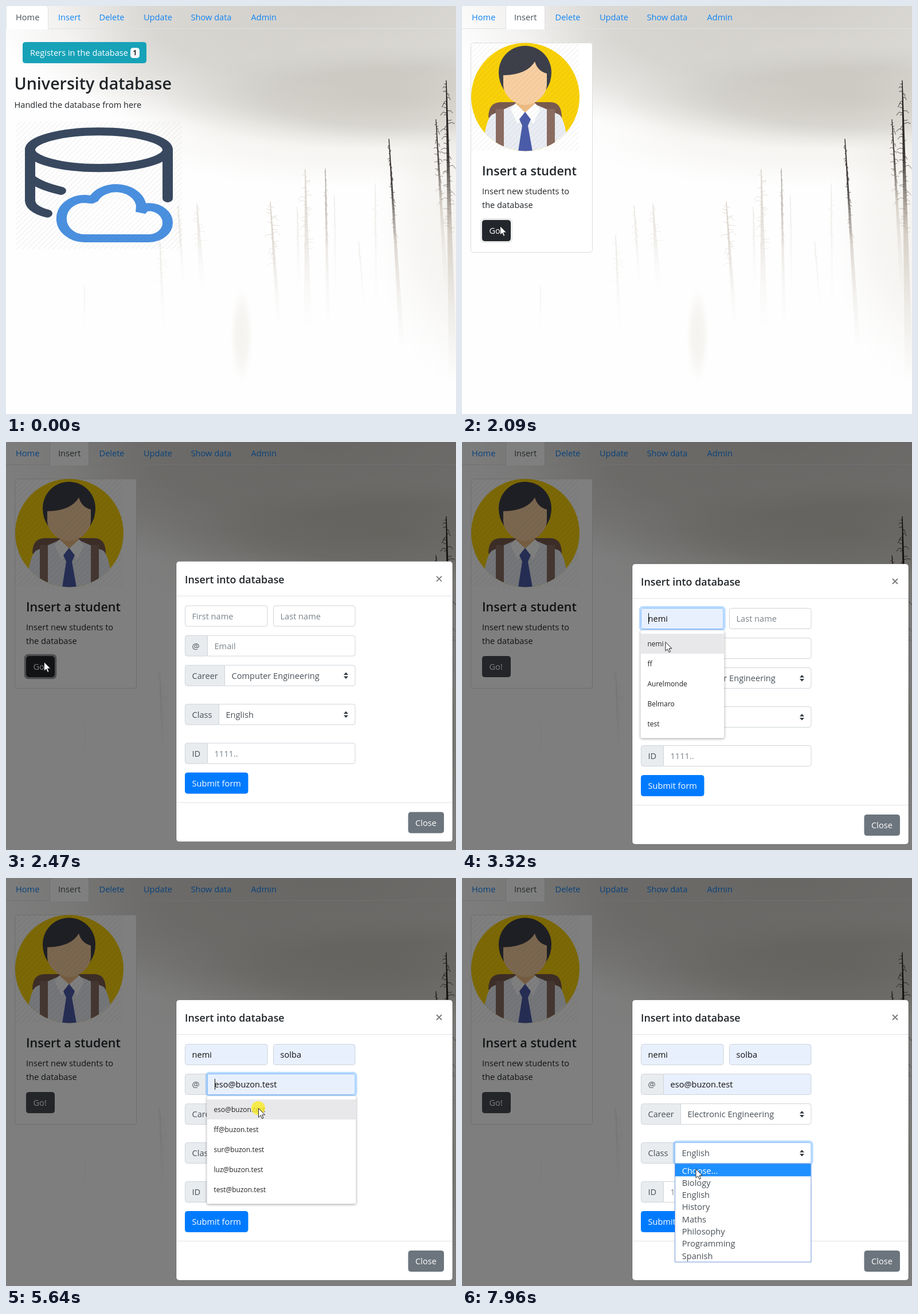
Recreate the animation shown at these times as an HTML page with a canvas. Size 785 by 713 pixels, loop 8000 ms.

```html
<!DOCTYPE html>
<html lang="en">
<head>
<meta charset="utf-8">
<title>University database</title>
<style>
html, body { margin: 0; width: 100%; height: 100%; overflow: hidden; background: #fff; }
canvas { display: block; width: 100vw; height: 100vh; }
</style>
</head>
<body>
<canvas id="stage" width="785" height="713"></canvas>
<script>
const W = 785, H = 713, LOOP = 8000;
const stage = document.getElementById('stage');
let g = stage.getContext('2d');

const clamp = v => Math.max(0, Math.min(1, v));
const ramp = (t, start, len) => clamp((t - start) / len);
const within = (t, a, b) => t >= a && t < b;

function text(s, x, y, color, size = 14.6, weight = 400) {
  g.font = `${weight} ${size}px "Open Sans", "Noto Sans", sans-serif`;
  g.fillStyle = color;
  g.fillText(s, x, y);
}

function box(x, y, w, h, fill, line, r = 4) {
  g.beginPath();
  g.roundRect(x + .5, y + .5, w - 1, h - 1, r);
  if (fill) { g.fillStyle = fill; g.fill(); }
  g.strokeStyle = line || fill;
  g.lineWidth = 1;
  g.stroke();
}

function ring(x, y, w, h, color, alpha) {
  if (alpha <= 0) return;
  g.save();
  g.globalAlpha *= alpha;
  g.strokeStyle = color;
  g.lineWidth = 3.2;
  g.beginPath();
  g.roundRect(x - 1.6, y - 1.6, w + 3.2, h + 3.2, 5);
  g.stroke();
  g.restore();
}

function shape(d, fill, line, width) {
  const p = new Path2D(d);
  if (fill) { g.fillStyle = fill; g.fill(p); }
  if (line) { g.strokeStyle = line; g.lineWidth = width; g.stroke(p); }
}

function hatch(x, y, w, h) {
  g.save();
  g.beginPath();
  g.rect(x, y, w, h);
  g.clip();
  g.strokeStyle = 'rgba(90,90,90,.07)';
  g.lineWidth = 1.5;
  g.beginPath();
  for (let i = 0; i < w + h; i += 9) {
    g.moveTo(x + i, y);
    g.lineTo(x + i - h, y + h);
  }
  g.stroke();
  g.restore();
}

// Foggy backdrop, painted once.
function cloud(x, y, rx, ry, rgb, alpha) {
  g.save();
  g.translate(x, y);
  g.scale(rx, ry);
  const grad = g.createRadialGradient(0, 0, 0, 0, 0, 1);
  grad.addColorStop(0, `rgba(${rgb},${alpha})`);
  grad.addColorStop(.55, `rgba(${rgb},${alpha * .75})`);
  grad.addColorStop(.8, `rgba(${rgb},${alpha * .25})`);
  grad.addColorStop(1, `rgba(${rgb},0)`);
  g.fillStyle = grad;
  g.fillRect(-1, -1, 2, 2);
  g.restore();
}

let seed = 11;
const rnd = () => (seed = seed * 16807 % 2147483647) / 2147483647;

function tree(x0, y0, x1, y1, width, alpha, rgb, reach) {
  const grad = g.createLinearGradient(0, y0, 0, y1);
  grad.addColorStop(0, `rgba(${rgb},${alpha})`);
  grad.addColorStop(.25, `rgba(${rgb},${alpha * .8})`);
  grad.addColorStop(.5, `rgba(165,150,130,${alpha * .4})`);
  grad.addColorStop(.75, `rgba(185,175,160,${alpha * .15})`);
  grad.addColorStop(1, 'rgba(190,180,165,0)');
  g.fillStyle = g.strokeStyle = grad;
  const h = y1 - y0;
  g.beginPath();
  g.moveTo(x0 - .6, y0);
  g.lineTo(x0 + .6, y0);
  g.lineTo(x1 + width / 2, y1);
  g.lineTo(x1 - width / 2, y1);
  g.fill();
  g.lineWidth = .8;
  g.beginPath();
  for (let y = 6; y < h * .5; y += 3 + rnd() * 5) {
    const x = x0 + (x1 - x0) * y / h;
    const side = rnd() < .5 ? -1 : 1;
    const len = reach * (.3 + rnd() * .7) * Math.min(1, .3 + y / 50);
    g.moveTo(x, y0 + y);
    g.lineTo(x + side * len * .6, y0 + y + rnd() * 4 - 3);
    g.lineTo(x + side * len, y0 + y + rnd() * 8 - 3);
  }
  g.stroke();
}

function paintFog() {
  g.fillStyle = '#fefefe';
  g.fillRect(0, 0, W, H);
  cloud(610, 220, 430, 100, '232,229,222', .4);
  cloud(560, -20, 600, 270, '203,200,194', .9);
  cloud(690, 160, 420, 92, '188,186,175', .62);
  cloud(350, 100, 250, 110, '208,206,201', .4);
  cloud(810, 370, 170, 300, '226,222,214', .35);
  const pale = '172,158,136', dark = '22,16,14';
  [
    [268, 400, 275, 570, 7, .2, 12], [300, 348, 310, 490, 7, .24, 9],
    [333, 345, 343, 500, 12, .28, 14], [461, 342, 476, 560, 9, .46, 15],
    [508, 350, 511, 510, 7, .16, 6], [522, 285, 527, 570, 14, .4, 14],
    [573, 330, 575, 520, 5, .15, 4], [615, 410, 626, 540, 3, .18, 3],
    [644, 310, 646, 540, 5, .18, 6], [137, 490, 137, 575, 3, .12, 2]
  ].forEach(([a, b, c, d, w, o, r]) => tree(a, b, c, d, w, o, pale, r));
  tree(557, 284, 562, 560, 7, .5, '115,106,94', 4);
  tree(668, 232, 691, 600, 9, .9, dark, 5);
  tree(750, 198, 768, 500, 8, .85, dark, 8);
  tree(768, 130, 780, 660, 15, 1, dark, 13);
  cloud(411, 575, 20, 85, '200,190,170', .17);
}

const fog = document.createElement('canvas');
fog.width = W;
fog.height = H;
{
  const main = g;
  g = fog.getContext('2d');
  paintFog();
  g = main;
}

// Pointer route: time, x, y of the tip.
const route = [
  [300, 688, 712], [780, 106, 14], [1180, 106, 14], [1780, 66, 384],
  [2670, 66, 384], [3040, 338, 307], [3150, 338, 307], [3310, 354.5, 349],
  [3640, 354.5, 349], [3990, 498, 307], [4130, 498, 307], [4340, 505, 351],
  [4480, 505, 351], [4740, 432, 359], [5010, 432, 359], [5410, 440, 402],
  [5740, 440, 402], [5880, 446, 408], [6020, 446, 408], [6220, 450, 412],
  [6340, 450, 412], [6560, 419, 465], [6620, 419, 465], [6800, 430, 493],
  [7400, 430, 493], [7680, 432, 478], [7790, 432, 478], [7950, 407.5, 508]
];
// Time of each press and how long its marker stays.
const presses = [[1000, 150], [1880, 150], [3050, 120], [3550, 130], [4040, 120], [4400, 130],
  [4750, 120], [5640, 130], [6240, 120], [6950, 230], [7690, 120]];

function pointer(t) {
  if (t < route[0][0]) return { x: -99, y: -99 };
  const i = route.findIndex(k => k[0] > t);
  if (i < 0) return { x: route.at(-1)[1], y: route.at(-1)[2] };
  const [ta, xa, ya] = route[i - 1], [tb, xb, yb] = route[i];
  const u = (t - ta) / (tb - ta), e = u * u * (3 - 2 * u);
  return { x: xa + (xb - xa) * e, y: ya + (yb - ya) * e };
}
const over = (p, x, y, w, h) => p.x >= x && p.x < x + w && p.y >= y && p.y < y + h;

function drawPointer(t, p) {
  if (presses.some(([a, len]) => within(t, a, a + len))) {
    g.fillStyle = 'rgba(250,236,40,.82)';
    g.beginPath();
    g.arc(p.x, p.y, 12, 0, 7);
    g.fill();
  }
  g.save();
  g.translate(p.x, p.y);
  g.lineJoin = 'miter';
  shape('M.5 .5V16.2L4.1 12.8 6.6 18.4 9 17.3 6.6 11.9H11.6Z', '#fff', '#222', 1);
  g.restore();
}

const tabs = [['Home', 17], ['Insert', 91], ['Delete', 162.5], ['Update', 240],
  ['Show data', 322.5], ['Admin', 427.5]];

function drawTabs(t) {
  const active = t < 1070 ? 0 : 1;
  g.fillStyle = '#dee2e6';
  g.fillRect(0, 39, W, 1);
  const [x, w] = active ? [76, 69] : [0, 74];
  g.beginPath();
  g.roundRect(x + .5, -.5, w - 1, 41, [4, 4, 0, 0]);
  g.fillStyle = '#fff';
  g.fill();
  g.strokeStyle = '#dee2e6';
  g.lineWidth = 1;
  g.stroke();
  g.fillStyle = '#fff';
  g.fillRect(x + 1, 39, w - 2, 2);
  tabs.forEach(([name, tx], i) => text(name, tx, 25, i === active ? '#495057' : '#0f84f5'));
}

// The icon is squashed vertically, so its strokes are thinner across the top.
function drawDisk() {
  const ink = '#38485f';
  g.save();
  g.translate(0, 202);
  g.scale(1, .78);
  g.lineCap = g.lineJoin = 'round';
  shape('M42 63V177Q43 196 72 206M42 126Q58 144 96 155M282 63V172', null, ink, 18);
  shape('M42 63A120 41 0 0 1 282 63A120 41 0 0 1 42 63Z', 'rgba(255,255,255,.85)', ink, 18);
  g.lineCap = 'butt';
  g.lineJoin = 'bevel';
  shape('M137 261.5A40 44 0 0 1 137 173L152 175A44 44 0 0 1 236 190L235 203Q240 191.5 249 191.5A33 35 0 0 1 249 261.5Z',
    '#fff', '#4a90e0', 18);
  g.restore();
  hatch(17, 202, 290, 223);
}

function drawHome(p) {
  box(29, 63, 216, 37, over(p, 29, 63, 216, 37) ? '#138496' : '#17a2b8');
  text('Registers in the database', 42, 87, '#fff');
  box(217, 73, 16, 18, '#f8f9fa');
  text('1', 221.5, 86, '#212529', 11.5, 700);
  text('University database', 14.5, 146, '#212529', 28.6, 600);
  text('Handled the database from here', 14.5, 177.5, '#212529');
  drawDisk();
}

function drawStudent() {
  g.save();
  g.beginPath();
  g.arc(110.5, 159, 94.5, 0, 7);
  g.clip();
  g.fillStyle = '#f9d108';
  g.fillRect(15, 64, 192, 190);
  shape('M46 195Q46 168 68 168H154Q174 168 174 195Z', '#795a4e');
  shape('M36 254Q40 200 52 190L92 172H128L170 190Q181 200 186 254Z', '#e9edf3');
  g.fillStyle = '#8a6c61';
  g.fillRect(59, 180, 14, 65);
  g.fillRect(148, 180, 14, 65);
  shape('M94 158H127V172L110 187 94 172Z', '#edbb82');
  shape('M93 170L110 186 97 206 85 181ZM128 170L110 186 124 206 136 181Z', '#fff');
  shape('M110 185L120 198 115 209H105L100 198ZM105 209H115L123 254H98Z', '#4a5ba9');
  shape('M73 146Q64 133 64 116A46 46.5 0 0 1 156 116Q156 133 147 146Z', '#3c3f49');
  shape('M72 121Q114 120 127 97Q132 114 148 118V137C148 158 126 173 110 173S72 158 72 137Z', '#f8cfa1');
  g.restore();
  hatch(16, 65, 188, 188);
}

function drawInsert(t, p) {
  box(15, 64, 213, 367, '#fff', '#dcdcdc');
  drawStudent();
  text('Insert a student', 35, 296, '#212529', 21.5, 600);
  text('Insert new students to', 35, 329, '#212529');
  text('the database', 35, 352.5, '#212529');
  ring(35, 374, 50, 37, 'rgba(52,58,64,.5)', ramp(t, 2060, 150) - ramp(t, 2600, 100));
  const fill = over(p, 35, 374, 50, 37) ? '#23272b' : t > 2670 ? '#464b50' : '#343a40';
  box(35, 374, 50, 37, fill);
  text('Go!', 47.5, 398, '#fff');
}

const NEVER = 1e9;
const fields = [
  { x: 312, y: 290, w: 144.5, hint: 'First name', on: 3060, off: 4050, open: 3130, pick: 3630,
    list: ['nemi', 'ff', 'Aurelmonde', 'Belmaro', 'test'] },
  { x: 466, y: 290, w: 143.5, hint: 'Last name', on: 4050, off: 4760, open: 4120, pick: 4480,
    list: ['solba', 'ff', 'Morvael', 'Luza', 'ulmetra'] },
  { x: 351, y: 342, w: 258.5, tag: '@', hint: 'Email', on: 4760, off: 6250, open: 4840, pick: 5720,
    list: ['eso@buzon.test', 'ff@buzon.test', 'sur@buzon.test', 'luz@buzon.test', 'test@buzon.test'] },
  { x: 381, y: 394, w: 228.5, tag: 'Career', select: true, from: 1, to: 2,
    on: 6250, off: 7700, open: 6320, pick: 7180,
    list: ['Choose...', 'Computer Engineering', 'Electronic Engineering', 'Human Resources', 'Music',
      'Systems Engineering'] },
  { x: 371, y: 462, w: 238.5, tag: 'Class', select: true, from: 2, to: 2,
    on: 7700, off: NEVER, open: 7780, pick: NEVER,
    list: ['Choose...', 'Biology', 'English', 'History', 'Maths', 'Philosophy', 'Programming', 'Spanish'] },
  { x: 351, y: 530, w: 258.5, tag: 'ID', hint: '1111..', on: NEVER, off: NEVER, open: NEVER, pick: NEVER, list: [] }
];

const isOpen = (f, t) => within(t, f.open, f.pick);
const rows = f => f.select ? { top: f.y + 38, step: 21.33 } : { top: f.y + 45, step: 35 };

function hovered(f, p) {
  const { top, step } = rows(f);
  return over(p, f.x, top, f.w, step * f.list.length) ? Math.floor((p.y - top) / step) : -1;
}

function drawField(f, t, p) {
  const { x, y, w } = f, h = 37;
  if (f.tag) {
    box(312, y, x - 310, h, '#e9ecef', '#ced4da');
    text(f.tag, 324.5, y + 24.2, '#495057');
  }
  const focus = within(t, f.on, f.off);
  let value = '';
  if (f.select) value = f.list[t < f.pick ? f.from : f.to];
  else if (t >= f.pick) value = f.list[0];
  else if (isOpen(f, t)) value = f.list[hovered(f, p)] || '';
  const filled = value && !f.select;
  if (focus) ring(x, y, w, h, 'rgba(0,123,255,.27)', ramp(t, f.on, 150));
  box(x, y, w, h, filled ? '#e8f0fe' : '#fff', focus ? '#80bdff' : '#ced4da', f.tag ? [0, 4, 4, 0] : 4);
  const color = f.select ? '#495057' : filled ? '#111' : '#7b838a';
  text(value || f.hint, x + 12.5, y + 24.2, color);
  if (f.select) shape(`M589 ${y + 17.5}h8l-4-4.5zM589 ${y + 20}h8l-4 4.5z`, '#343a40');
  if (focus && !f.select && t < f.pick) {
    g.fillStyle = '#111';
    g.fillRect(x + 13, y + 9, 1, 19);
  }
}

function drawList(f, t, p) {
  const { top, step } = rows(f), { x, y, w, list } = f;
  let mark = hovered(f, p);
  if (f.select) {
    if (mark < 0) mark = f.from;
    box(x, y + 37, w, step * list.length + 2, '#fff', '#6f95d8', 0);
    g.fillStyle = '#1e90ff';
    g.fillRect(x + 1, top + mark * step, w - 2, step);
    list.forEach((s, i) => text(s, x + 12.7, top + i * step + 16.5, i === mark ? '#fff' : '#495057'));
    return;
  }
  g.save();
  g.shadowColor = 'rgba(0,0,0,.4)';
  g.shadowBlur = 4;
  g.shadowOffsetY = 1;
  g.fillStyle = '#fff';
  g.beginPath();
  g.roundRect(x - .5, y + 39, w + 1.5, step * list.length + 13.5, 3);
  g.fill();
  g.restore();
  if (mark >= 0) {
    g.fillStyle = '#e8e8eb';
    g.fillRect(x - .5, top + mark * step, w + 1.5, step);
  }
  list.forEach((s, i) => text(s, x + 11.5, top + i * step + 22, '#202124', 12));
}

function drawModal(t, p) {
  const u = 1 - ramp(t, 2260, 300);
  g.save();
  g.globalAlpha = ramp(t, 2260, 150);
  g.translate(0, -50 * u * u);
  box(296.5, 212.5, 483, 491, '#fff', 'rgba(0,0,0,.25)', 5);
  text('Insert into database', 312, 251, '#212529', 17.9, 600);
  shape('M751 239l9 9m0-9l-9 9', null, '#7f7f7f', 2);
  g.fillStyle = '#dee2e6';
  g.fillRect(297, 273, 482, 1);
  g.fillRect(297, 634, 482, 1);
  fields.forEach(f => drawField(f, t, p));
  box(312, 582, 110.5, 37, '#007bff');
  text('Submit form', 324.5, 606, '#fff');
  box(701.5, 651, 62.5, 37, '#6c757d');
  text('Close', 714, 675, '#fff');
  fields.filter(f => isOpen(f, t)).forEach(f => drawList(f, t, p));
  g.restore();
}

function draw(t) {
  const p = pointer(t);
  g.globalAlpha = 1;
  g.drawImage(fog, 0, 0);
  drawTabs(t);
  g.globalAlpha = 1 - ramp(t, 1070, 130);
  if (g.globalAlpha > 0) drawHome(p);
  g.globalAlpha = ramp(t, 1200, 150);
  if (g.globalAlpha > 0) drawInsert(t, p);
  g.globalAlpha = 1;
  g.fillStyle = `rgba(0,0,0,${.5 * ramp(t, 2095, 140)})`;
  g.fillRect(0, 0, W, H);
  if (t > 2260) drawModal(t, p);
  if (t >= 300) drawPointer(t, p);
}

const begin = performance.now();
function tick() {
  draw((performance.now() - begin) % LOOP);
  requestAnimationFrame(tick);
}
tick();
</script>
</body>
</html>
```
